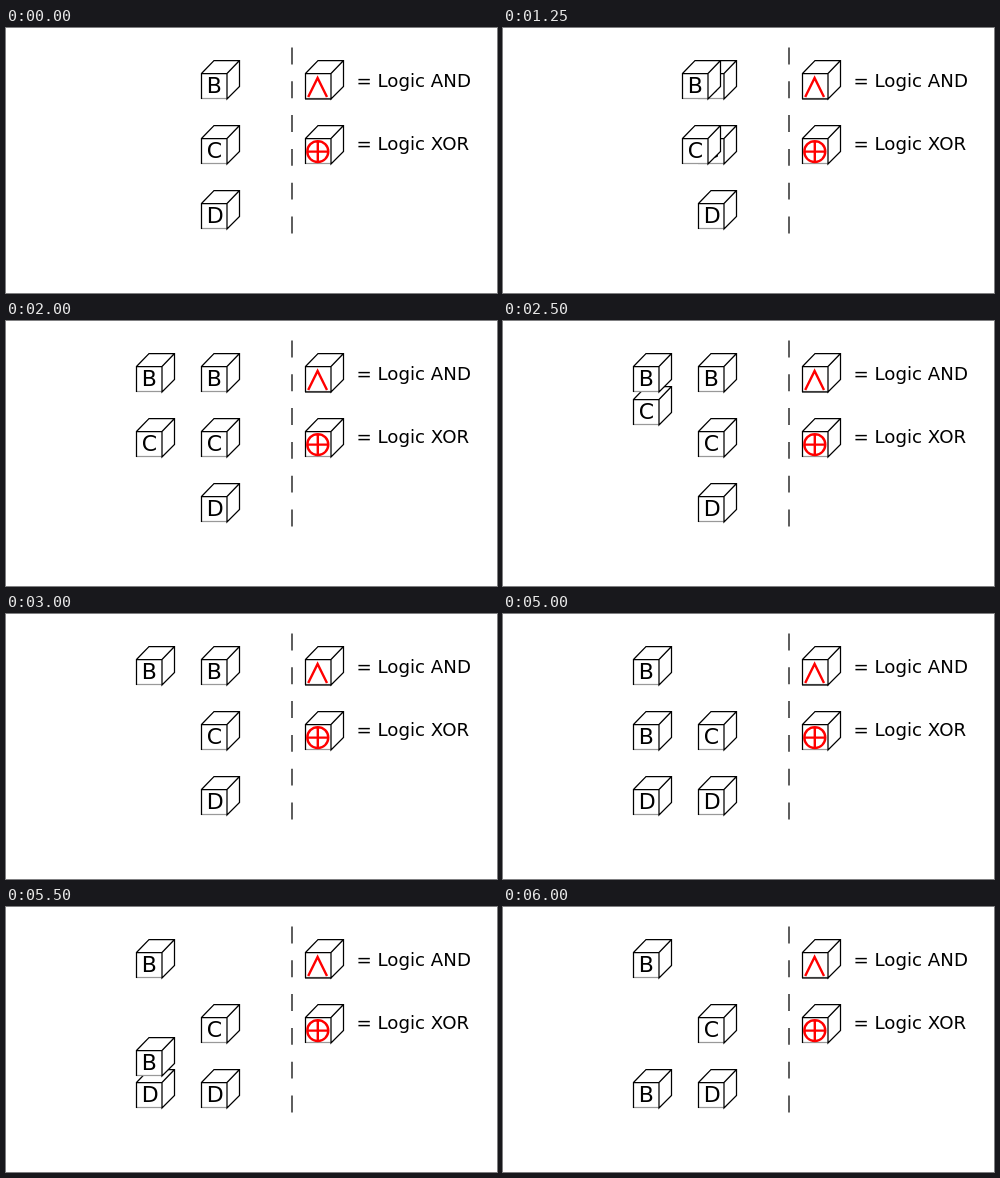
An HTML page for the animation above (8 s loop, 491x265 px).

```html
<!DOCTYPE html>
<html lang="en">
<head>
<meta charset="utf-8">
<title>Logic blocks</title>
<style>
  html, body { margin: 0; width: 100%; height: 100%; overflow: hidden; background: #fff; }
  svg { display: block; width: 491px; height: 265px; }
  text { font-family: "DejaVu Sans", sans-serif; fill: #000; }
  .letter { font-size: 22px; }
  .label { font-size: 18.2px; }
  .edge { fill: none; stroke: #000; stroke-width: 1.25; }
  .base { stroke: #999; }
  .sign { fill: none; stroke: #f00; stroke-width: 2.4; }

  .move { animation: 8s step-end infinite; }
  .leave { animation-name: leave; }
  .left { animation-name: left; }
  .left-up { animation-name: left-up; }
  .down { animation-name: down; }
  .brief { animation-name: brief; }

  @keyframes leave {
    0% { visibility: visible; }
    62.5%, 100% { visibility: hidden; }
  }
  @keyframes left {
    0% { visibility: hidden; }
    15.625% { visibility: visible; transform: translate(49px, 0); }
    18.75% { visibility: visible; transform: translate(32px, 0); }
    21.875% { visibility: visible; transform: translate(16px, 0); }
    25%, 100% { visibility: visible; transform: none; }
  }
  @keyframes left-up {
    0% { visibility: hidden; }
    15.625% { visibility: visible; transform: translate(49px, 0); }
    18.75% { visibility: visible; transform: translate(32px, 0); }
    21.875% { visibility: visible; transform: translate(16px, 0); }
    25% { visibility: visible; transform: none; }
    28.125% { visibility: visible; transform: translate(0, -16px); }
    31.25% { visibility: visible; transform: translate(0, -32px); }
    34.375% { visibility: visible; transform: translate(0, -48px); }
    37.5%, 100% { visibility: hidden; }
  }
  @keyframes down {
    0% { visibility: hidden; }
    62.5% { visibility: visible; transform: none; }
    65.625% { visibility: visible; transform: translate(0, 16px); }
    68.75% { visibility: visible; transform: translate(0, 33px); }
    71.875% { visibility: visible; transform: translate(0, 49px); }
    75%, 100% { visibility: visible; transform: translate(0, 65px); }
  }
  @keyframes brief {
    0% { visibility: hidden; }
    62.5% { visibility: visible; }
    75%, 100% { visibility: hidden; }
  }
</style>
</head>
<body>
<svg viewBox="0 0 491 265">
  <defs>
    <g id="cube">
      <path fill="#fff" d="M0 13.5 13 .5H38.5V26L26 39H0Z"/>
      <path class="edge base" d="M0 38.5H26"/>
      <path class="edge" d="M.5 39V13.5H26V39L38.5 26.5V.5H13L.5 13.5M26 13.5 38.5 .5"/>
    </g>
    <g id="B"><use href="#cube"/><text class="letter" x="5.8" y="33">B</text></g>
    <g id="C"><use href="#cube"/><text class="letter" x="5.8" y="33">C</text></g>
    <g id="D"><use href="#cube"/><text class="letter" x="5.8" y="33">D</text></g>
  </defs>

  <path class="edge" stroke-dasharray="16.9 16.9" d="M286 19.5V206"/>

  <use href="#cube" x="299" y="32"/>
  <path class="edge" d="M299 71H325.5"/>
  <path class="sign" d="M302.2 69 311.6 50 321 69"/>
  <text class="label" x="350.5" y="59">= Logic AND</text>

  <use href="#cube" x="299" y="97"/>
  <path class="sign" d="M301.3 123.6a10.5 10.5 0 1 0 21 0a10.5 10.5 0 1 0 -21 0H322.3M311.8 113.1V134.1"/>
  <text class="label" x="350.5" y="122">= Logic XOR</text>

  <g class="move leave"><use href="#B" x="195" y="32"/></g>
  <use href="#C" x="195" y="97"/>
  <use href="#D" x="195" y="162"/>

  <g class="move left-up"><use href="#C" x="130" y="97"/></g>
  <g class="move left"><use href="#B" x="130" y="32"/></g>
  <g class="move brief"><use href="#D" x="130" y="162"/></g>
  <g class="move down"><use href="#B" x="130" y="97"/></g>
</svg>
</body>
</html>
```
